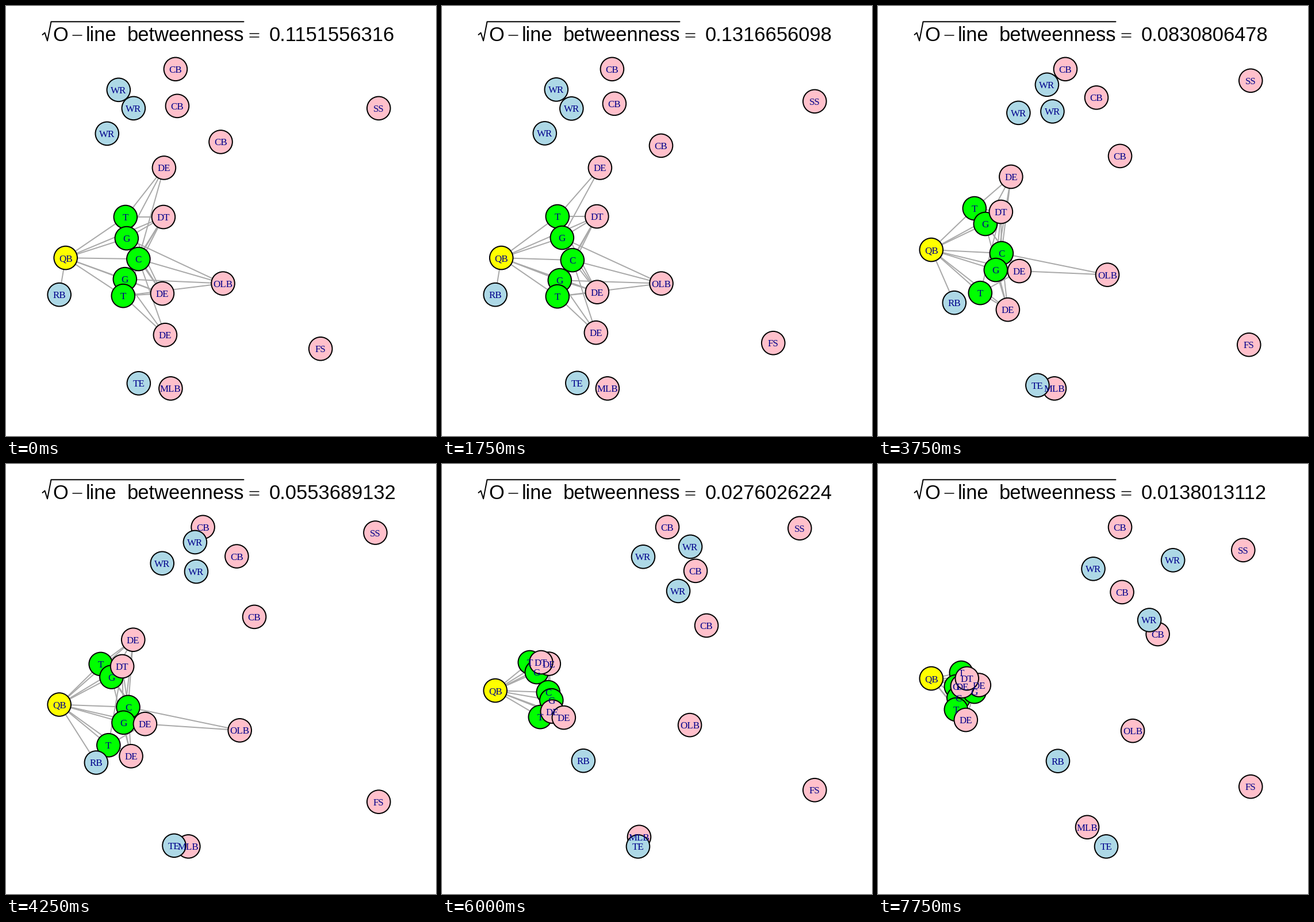
Recreate the animation shown at these times as a matplotlib script. Size 748x748 px, loop 8000 ms.

```python
import numpy as np
import matplotlib.pyplot as plt
from matplotlib.animation import FuncAnimation
from matplotlib.collections import LineCollection
from matplotlib.patches import Circle

SIZE, DPI = 748, 68
PT = 72 / DPI                      # points per pixel
STEPS, STEP_MS = 32, 250
RADIUS = 20.3
REACH = np.array([207, 165])       # half axes of the contact ellipse
LOW, HIGH = np.array([92.7, 109.8]), np.array([648.3, 665.3])

KEYS = np.array([0, 7, 11, 15, 20, 24, 31])
SCORES = np.array([0.1151556316, 0.1316656098, 0.1086574931, 0.0830806478,
                   0.0138013112, 0.0276026224, 0.0138013112])

FILL = {"line": "#00FF00", "defense": "#FFC0CB",
        "skill": "#ADD8E6", "passer": "#FFFF00"}
players = []


def player(label, role, xs, ys):
    players.append((label, role, np.column_stack([xs, ys])))


# Drawing order runs from bottom to top.
player("T", "line", [208, 201, 175, 168, 160, 153, 145],
       [367, 366, 362, 352, 343, 345, 363])
player("G", "line", [210, 209, 193, 187, 177, 165, 136],
       [404, 403, 396, 379, 361, 362, 387])
player("C", "line", [230.5, 227, 212, 215, 203.5, 185, 140.5],
       [440, 442, 440, 430, 409, 397, 407])
player("G", "line", [207, 205, 195, 205, 202, 190.5, 168],
       [475, 477, 474, 459, 432, 411, 396])
player("T", "line", [204, 201, 180, 178, 179, 171, 136],
       [504, 505, 506, 499, 465, 440, 427])
player("DE", "defense", [277, 268, 241.5, 226, 205, 192, 176],
       [572, 568, 557, 528, 472, 430.5, 384.5])
player("DE", "defense", [275, 275, 251, 231.5, 205.5, 186, 147],
       [281.5, 281.5, 286, 297, 321, 347.5, 386.5])
player("DT", "defense", [274, 269.5, 237, 214, 186, 172.5, 155],
       [367, 366, 366, 358, 344, 345, 373])
player("DE", "defense", [272, 270, 252, 246, 233, 212, 153],
       [500, 497.5, 484, 461, 442, 441, 445])
player("OLB", "defense", [377.5, 381.5, 382, 399, 416, 431, 443],
       [482.5, 482.5, 478, 467.5, 456.5, 454, 464])
player("MLB", "defense", [286.5, 288, 284.5, 307, 330, 343, 364],
       [665, 665, 665, 665, 659, 648.5, 631.5])
player("CB", "defense", [295, 296, 297, 326, 366, 392, 421],
       [110, 110, 110, 110, 110, 110, 110])
player("CB", "defense", [298, 300, 325, 380, 424.5, 441, 424.5],
       [174, 170, 164, 159.5, 165, 186, 223])
player("CB", "defense", [373.5, 381, 389, 421, 444, 460, 486.5],
       [236.5, 243, 250, 261, 272, 281, 296])
player("SS", "defense", [648, 648, 648, 648, 626, 622, 635],
       [178, 166, 151, 130, 110, 112, 150])
player("FS", "defense", [547, 576, 609, 645, 648, 648, 648],
       [596, 586, 588, 589, 578, 567, 561])
player("WR", "skill", [196, 199, 222, 294, 377, 432, 513],
       [146, 145.5, 142.5, 137, 135.5, 144, 167.5])
player("WR", "skill", [222, 225.5, 244, 303.5, 368, 411, 472],
       [178, 178.5, 181, 183.5, 196.5, 221, 271.5])
player("WR", "skill", [176, 179, 190.5, 244.5, 309.5, 350, 374.5],
       [222, 221.5, 211.5, 186, 160, 161.5, 182.5])
player("TE", "skill", [231, 235.5, 243.5, 277.5, 313, 341, 397],
       [656, 655.5, 656, 659.5, 665, 665, 665])
player("RB", "skill", [93, 93, 93, 133, 195.5, 246, 313],
       [502, 502, 505.5, 516, 520, 516, 516.5])
player("QB", "passer", [104, 103.5, 94, 93, 93, 93, 93],
       [438, 438, 433, 424, 407, 394, 373])

TRACKS = np.stack([p[2] for p in players], axis=1)


def slopes(values):
    """Monotone slopes at the keys, so nothing overshoots."""
    secant = np.diff(values, axis=0) / np.diff(KEYS)[:, None, None]
    a, b = secant[:-1], secant[1:]
    same = a * b > 0
    inner = np.where(same, 2 * a * b / np.where(same, a + b, 1), 0)
    return np.concatenate([secant[:1], inner, secant[-1:]])


SLOPES = slopes(TRACKS)


def positions(step):
    k = min(np.searchsorted(KEYS, step, side="right") - 1, len(KEYS) - 2)
    span = KEYS[k + 1] - KEYS[k]
    u = (step - KEYS[k]) / span
    ease = u * u * (3 - 2 * u)
    pos = (TRACKS[k] * (1 - ease) + TRACKS[k + 1] * ease
           + span * u * (1 - u) * ((1 - u) * SLOPES[k] - u * SLOPES[k + 1]))
    # The layout always fills the whole plot area.
    low, high = pos.min(axis=0), pos.max(axis=0)
    return LOW + (pos - low) / (high - low) * (HIGH - LOW)


def can_link(a, b):
    roles = {a[1], b[1]}
    if "passer" in roles:
        return "skill" not in roles or "RB" in (a[0], b[0])
    return roles == {"line", "defense"}


PAIRS = [(i, j) for i in range(len(players)) for j in range(i)
         if can_link(players[i], players[j])]

fig = plt.figure(figsize=(SIZE / DPI, SIZE / DPI), dpi=DPI, facecolor="white")
ax = fig.add_axes([0, 0, 1, 1])
ax.set(xlim=(0, SIZE), ylim=(SIZE, 0))
ax.axis("off")


def heading(x, text):
    return ax.text(x, 61, text, family="Liberation Sans",
                   size=34.56 * PT, va="baseline", ha="left")


def stroke(xs, ys, width):
    ax.plot(xs, ys, color="black", lw=width * PT,
            solid_capstyle="round", solid_joinstyle="round")


stroke([63.5, 67.5, 72, 78.5, 413.5], [50, 46.5, 60.5, 27.3, 27.3], 2)
heading(81.5, "O")
stroke([116.5, 132], [50.5, 50.5], 1.5)
heading(138.8, "line")
heading(210.8, "betweenness")
for y in (47.5, 54):
    stroke([424.5, 440], [y, y], 1.5)
score = heading(457.6, "")

edges = LineCollection([], colors="#A9A9A9", linewidths=2 * PT, zorder=3)
ax.add_collection(edges)
discs, labels = [], []
for n, (label, role, _) in enumerate(players):
    disc = Circle((0, 0), RADIUS, fc=FILL[role], ec="black",
                  lw=2 * PT, zorder=4 + n / 100)
    discs.append(ax.add_patch(disc))
    labels.append(ax.text(0, 0, label, family="Liberation Serif",
                          size=17 * PT, color="#00008B", ha="center",
                          va="baseline", zorder=5))


def draw(step):
    pos = positions(step)
    for disc, label, (x, y) in zip(discs, labels, pos):
        disc.center = x, y
        label.set_position((x, y + 6))
    edges.set_segments([(pos[i], pos[j]) for i, j in PAIRS
                        if np.hypot(*((pos[i] - pos[j]) / REACH)) < 1])
    score.set_text(f"{np.interp(step, KEYS, SCORES):.10f}")
    return [edges, score, *discs, *labels]


anim = FuncAnimation(fig, draw, frames=STEPS, interval=STEP_MS,
                     repeat=True, repeat_delay=0, blit=False)
plt.show()
```
